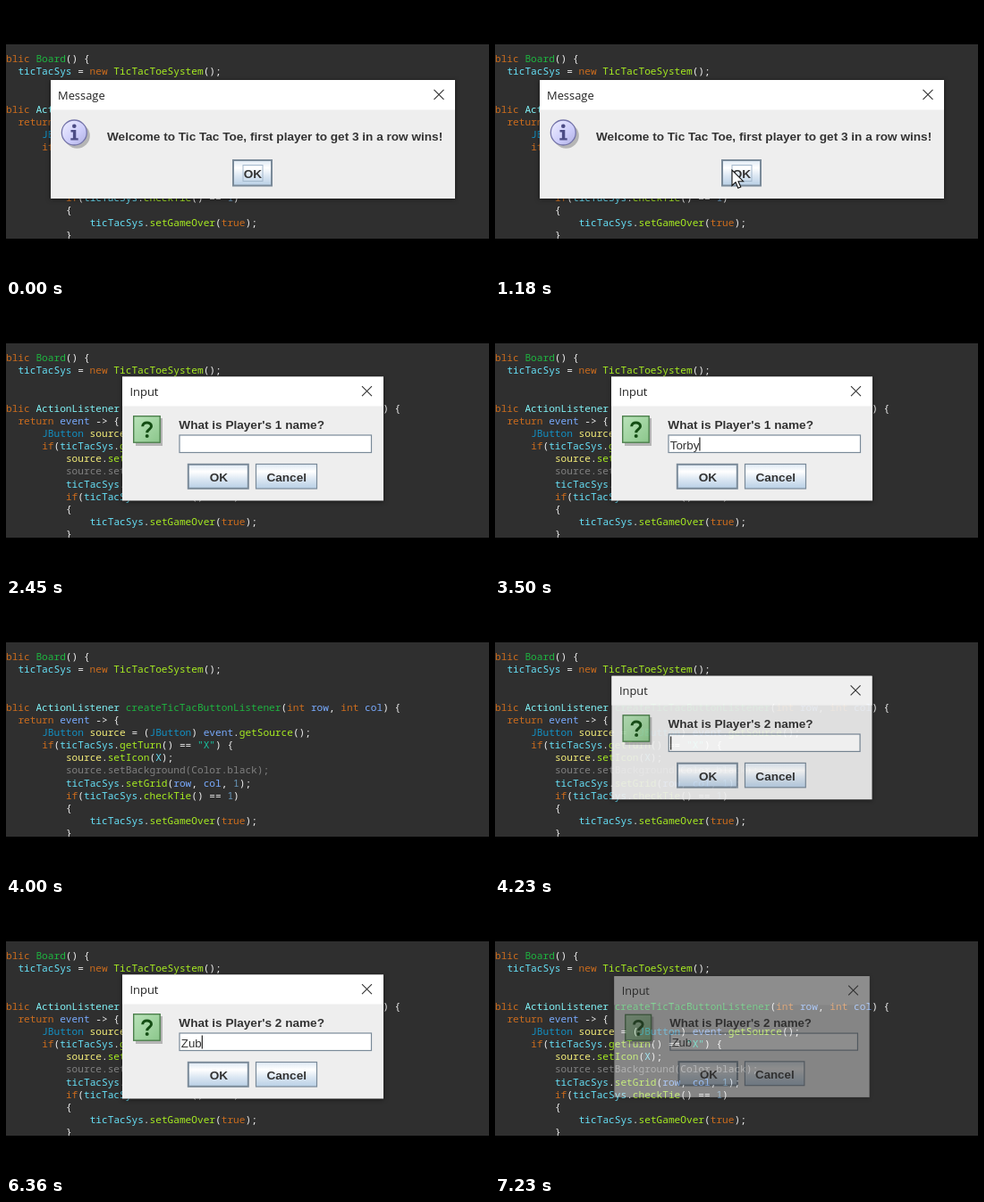
An HTML page for the animation above (7.28 s loop, 540 by 304 pixels).

```html
<!DOCTYPE html>
<html lang="en">
<head>
<meta charset="utf-8">
<title>Tic Tac Toe dialogs</title>
<style>
  html, body { margin: 0; width: 100%; height: 100%; overflow: hidden; background: #000; }
  svg { display: block; width: 540px; height: 304px; }
  text { white-space: pre; font-kerning: none; }
  .code { font: 500 11.15px "Noto Sans Mono", "DejaVu Sans Mono", monospace; }
  .title { font: 12.9px "Open Sans", "Noto Sans", sans-serif; fill: #222; }
  .bold { font: bold 13.6px "Liberation Sans", Arial, sans-serif; fill: #333; }
  .entry { font: 13.3px "Liberation Sans", Arial, sans-serif; fill: #333; }
  .mid { text-anchor: middle; }
  .window { filter: drop-shadow(0 1px 2.5px rgba(0, 0, 0, .5)); }
</style>
</head>
<body>
<svg viewBox="0 0 540 304">
  <defs>
    <linearGradient id="metal" x2="0" y2="1">
      <stop stop-color="#dde8f3"/><stop offset=".3" stop-color="#fff"/>
      <stop offset=".6" stop-color="#dde8f3"/><stop offset="1" stop-color="#b8cfe5"/>
    </linearGradient>
    <linearGradient id="lilac" x2="1" y2="1">
      <stop stop-color="#f0f0ff"/><stop offset=".6" stop-color="#ccccfa"/><stop offset="1" stop-color="#aeaee0"/>
    </linearGradient>
    <linearGradient id="green" x2="1" y2="1">
      <stop stop-color="#b9e3b9"/><stop offset="1" stop-color="#8cc78c"/>
    </linearGradient>
    <clipPath id="screen"><path d="M0 43h540v218H0z"/></clipPath>
  </defs>
  <rect width="540" height="304"/>
  <g clip-path="url(#screen)">
    <rect y="43" width="540" height="218" fill="#2f2f2f"/>
    <g id="code" class="code"></g>

    <g id="message">
      <g class="window">
        <rect x="50" y="83" width="452" height="133" fill="#eee"/>
        <rect x="50" y="83" width="452" height="33.5" fill="#fff"/>
      </g>
      <text class="title" x="58" y="104.6">Message</text>
      <path d="M478.5 93.8l11 11m0-11l-11 11" stroke="#333" stroke-width="1.1"/>
      <circle cx="79.5" cy="145.5" r="14.3" fill="#b5b5b5"/>
      <circle cx="76.3" cy="142" r="14" fill="url(#lilac)" stroke="#7373a8" stroke-width="1.3"/>
      <circle cx="76.3" cy="134.8" r="2.3" fill="#4c4c85"/>
      <path d="M72.5 139h5.8v9.2h2.4v2.3h-8.4v-2.3h2.6v-6.8h-2.4z" fill="#4c4c85"/>
      <text class="bold" x="113" y="151">Welcome to Tic Tac Toe, first player to get 3 in a row wins!</text>
      <rect id="press" x="254" y="173" width="43" height="28.5" fill="url(#metal)" stroke="#7a8a99" stroke-width="2"/>
      <rect x="265" y="178.5" width="22" height="18" fill="none" stroke="#a3b8cc"/>
      <text class="bold mid" x="276" y="193">OK</text>
    </g>

    <g id="input">
      <g class="window">
        <rect x="130" y="80.5" width="292" height="139" fill="#eee"/>
        <rect x="130" y="80.5" width="292" height="33" fill="#fff"/>
      </g>
      <text class="title" x="138.5" y="101.8">Input</text>
      <path d="M398 91.2l11 11m0-11l-11 11" stroke="#333" stroke-width="1.1"/>
      <rect x="145" y="127" width="30" height="31" fill="#b5b5b5"/>
      <rect x="142.7" y="124.7" width="29.5" height="29.5" fill="url(#green)" stroke="#4d804d" stroke-width="1.4"/>
      <path d="M152.7 136.2c0-5.6 9.8-5.6 9.8-.2 0 3.6-4.8 3.4-4.8 7.2" fill="none" stroke="#144d14" stroke-width="3"/>
      <circle cx="157.7" cy="147" r="2" fill="#144d14"/>
      <text id="label" class="bold" x="193.3" y="139"></text>
      <rect x="194" y="146" width="214.5" height="19.5" fill="#fff" stroke="#7a8a99" stroke-width="1.2"/>
      <text id="entry" class="entry" x="195.8" y="161.6"></text>
      <path id="caret" d="M0 148.5v15" stroke="#222" stroke-width="1.2"/>
      <rect x="203.8" y="178.8" width="67" height="27" fill="url(#metal)" stroke="#7a8a99" stroke-width="2"/>
      <text class="bold mid" x="238" y="197.8">OK</text>
      <rect x="279.5" y="178.5" width="68" height="27.5" fill="url(#metal)" stroke="#7a8a99" stroke-width="1.2"/>
      <text class="bold mid" x="313.7" y="197.8">Cancel</text>
    </g>

    <path id="pointer" d="M0 0v17.5l4-3.7 2.8 6.4 3-1.3-2.8-6.2h5.6z" fill="#fff" stroke="#111" stroke-width="1.1"/>
  </g>
</svg>
<script>
const LOOP = 7280, LAST = 7230, FADE = 200;
const $ = id => document.getElementById(id);
const clamp = v => Math.max(0, Math.min(1, v));

const ink = {
  o: '#cc6c1d', g: '#1eb540', w: '#f0f0f0', f: '#66e1f8', m: '#a7ec21', t: '#1290c3',
  i: '#80f2f6', p: '#79abff', y: '#f3ec79', s: '#17c6a3', n: '#6897bb', c: '#808080'
};
// row, column, then runs that each begin with an ink letter
const lines = [
  [0, 0, 'oblic |gBoard|w() {'],
  [1, 2, 'fticTacSys|w = |onew |mTicTacToeSystem|w();'],
  [4, 0, 'oblic |iActionListener |gcreateTicTacButtonListener|w(|oint |prow|w, |oint |pcol|w) {'],
  [5, 2, 'oreturn |pevent|w -> {'],
  [6, 6, 'tJButton |ysource|w = (|tJButton|w) |pevent|w.|mgetSource|w();'],
  [7, 6, 'oif|w(|fticTacSys|w.|mgetTurn|w() == |s"X"|w) {'],
  [8, 10, 'ysource|w.|msetIcon|w(|fX|w);'],
  [9, 10, 'csource.setBackground(Color.black);'],
  [10, 10, 'fticTacSys|w.|msetGrid|w(|prow|w, |pcol|w, |n1|w);'],
  [11, 10, 'oif|w(|fticTacSys|w.|mcheckTie|w() == |n1|w)'],
  [12, 10, 'w{'],
  [13, 14, 'fticTacSys|w.|msetGameOver|w(|otrue|w);'],
  [14, 10, 'w}']
];

function add(parent, tag, attrs, text = '') {
  const el = document.createElementNS(parent.namespaceURI, tag);
  for (const key in attrs) el.setAttribute(key, attrs[key]);
  el.textContent = text;
  return parent.appendChild(el);
}

for (const [row, col, runs] of lines) {
  const line = add($('code'), 'text', { x: col * 6.69, y: 63 + row * 14.15 });
  for (const run of runs.split('|')) add(line, 'tspan', { fill: ink[run[0]] }, run.slice(1));
}

const prompts = [
  { player: 1, open: 1820, close: 3720, name: 'Torby', keys: [2500, 2680, 2850, 3030, 3200] },
  { player: 2, open: 4046, close: 7120, name: 'Zub', keys: [4740, 5000, 5250] }
];
const closeMessage = 1500;

const level = (t, open, close) => clamp(Math.min((t - open) / FADE, 1 - (t - close) / FADE));

// Windows fade and grow slightly around the screen centre
function show(el, a) {
  const s = 0.958 + 0.042 * a;
  el.setAttribute('opacity', a);
  el.setAttribute('transform', `translate(276 150) scale(${s}) translate(-276 -150)`);
}

function draw(t) {
  show($('message'), level(t, -FADE, closeMessage));
  $('press').setAttribute('fill', t > 1360 && t < closeMessage ? '#b8cfe5' : 'url(#metal)');

  const prompt = prompts[t < 4000 ? 0 : 1];
  const typed = prompt.keys.filter(k => k <= t);
  const since = t - (typed.length ? typed[typed.length - 1] : prompt.open);
  show($('input'), level(t, prompt.open, prompt.close));
  $('label').textContent = `What is Player's ${prompt.player} name?`;
  $('entry').textContent = prompt.name.slice(0, typed.length);
  const end = typed.length ? $('entry').getComputedTextLength() : 0;
  $('caret').setAttribute('transform', `translate(${196.4 + end})`);
  $('caret').setAttribute('opacity', since % 1000 < 500 ? 1 : 0);

  const u = clamp((t - 500) / 550), ease = 1 - (1 - u) ** 3;
  $('pointer').setAttribute('transform', `translate(${305 - 40 * ease} ${262 - 78 * ease})`);
  $('pointer').setAttribute('opacity', level(t, 300, closeMessage));
}

function tick() {
  draw(Math.min(performance.now() % LOOP, LAST));
  requestAnimationFrame(tick);
}
tick();
</script>
</body>
</html>
```
